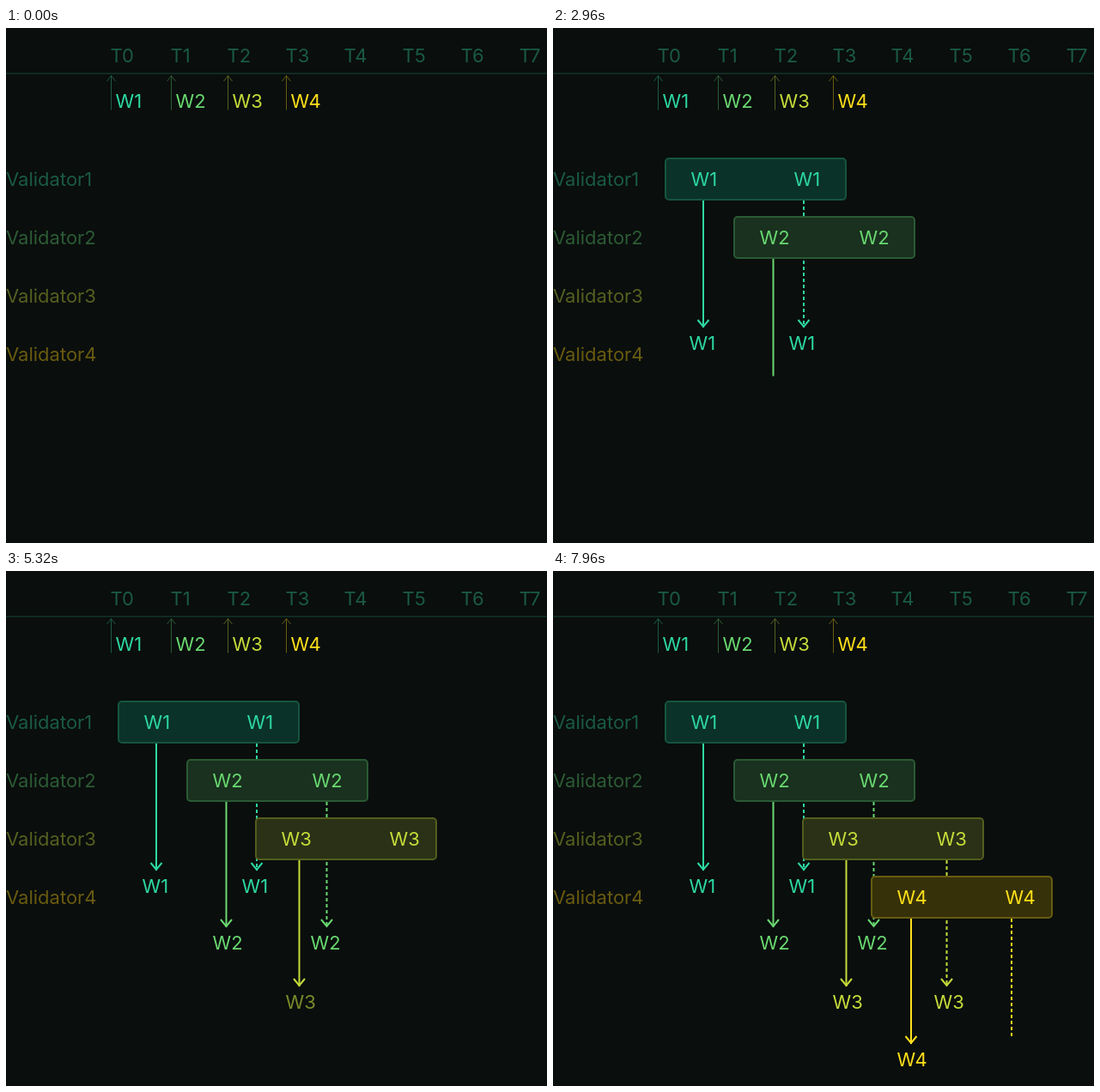
These frames come from a looping animation (630 by 600 pixels, 8000 ms). An HTML page:

```html
<!DOCTYPE html>
<html lang="en">
<head>
<meta charset="utf-8">
<title>Validator windows</title>
<style>
  html, body { margin: 0; width: 100%; height: 100%; overflow: hidden; background: #0a0e0d; }
  svg { display: block; width: 630px; height: 600px; }
  text { font: 22px Inter, "Liberation Sans", sans-serif; }
  path, line { fill: none; }
</style>
</head>
<body>
<svg id="stage" viewBox="0 0 630 600"></svg>
<script>
const LOOP = 8000, STEP = 2000;
const stage = document.getElementById('stage');

function add(parent, tag, attrs, text) {
  const el = document.createElementNS('http://www.w3.org/2000/svg', tag);
  for (const key in attrs) el.setAttribute(key, attrs[key]);
  if (text) el.textContent = text;
  parent.appendChild(el);
  return el;
}
const label = (parent, x, y, fill, text) => add(parent, 'text', { x: x - 0.4, y, fill }, text);

// solid and dashed: line x, label x, start y, tip y
const rows = [
  { color: '#2dd8a2', dim: '#1a5a45', fill: '#0b3228', edge: '#15543f', mark: 122, second: 281, base: 375,
    solid: [175, 159, 201, 349], dashed: [292, 275, 152, 349] },
  { color: '#69d870', dim: '#2c5b34', fill: '#19311e', edge: '#2a5a34', mark: 192, second: 357, base: 441,
    solid: [256.5, 241, 269, 415], dashed: [373.5, 355, 269, 415] },
  { color: '#c6dc3a', dim: '#565f1f', fill: '#2a3116', edge: '#545d1d', mark: 258, second: 447, base: 510,
    solid: [341.5, 326, 337, 484], dashed: [458.5, 444, 288, 484] },
  { color: '#ffe01a', dim: '#695b10', fill: '#363109', edge: '#675c10', mark: 326, second: 527, base: 577,
    solid: [417, 401, 405, 551], dashed: [534, 517, 356, 555] }
];

// timeline header
add(stage, 'line', { x1: 0, x2: 630, y1: 53, y2: 53, stroke: '#12352b', 'stroke-width': 1.5 });
[122, 192, 258, 326, 394, 462, 530, 598].forEach((x, i) => label(stage, x, 39.5, '#1a5a45', 'T' + i));

function addArrow([x, textX, top, tip], row, name, dash) {
  const pen = { stroke: row.color, 'stroke-width': 2 };
  return {
    top, tip,
    line: add(stage, 'line', { x1: x, x2: x, y1: top, y2: top, 'stroke-dasharray': dash, ...pen }),
    head: add(stage, 'path', { d: `M${x - 6.5} ${tip - 9}L${x} ${tip - 1}L${x + 6.5} ${tip - 9}`, ...pen }),
    text: label(stage, textX, row.base, row.color, name)
  };
}

rows.forEach((row, i) => {
  const name = 'W' + (i + 1), m = row.mark + 0.5, base = 183.5 + 68 * i, left = 131 + 80 * i;
  add(stage, 'path', { d: `M${m} 95.5V55.5M${m - 5} 62L${m} 55.5L${m + 5} 62`, stroke: row.dim });
  label(stage, row.mark + 6, 92.5, row.color, name);
  label(stage, 0.4, base, row.dim, 'Validator' + (i + 1));

  row.arrows = [addArrow(row.solid, row, name, 'none'), addArrow(row.dashed, row, name, '4 3')];

  row.box = add(stage, 'g', {});
  add(row.box, 'rect', { x: left, y: 152 + 68 * i, width: 210, height: 48, rx: 4,
    fill: row.fill, stroke: row.edge, 'stroke-width': 2 });
  label(row.box, left + 30, base, row.color, name);
  label(row.box, row.second, base, row.color, name);
});

const ramp = (t, start, length) => Math.min(1, Math.max(0, (t - start) / length));

function drawArrow(a, t) {
  const p = ramp(t, 0, 600);
  a.line.setAttribute('y2', a.top + (a.tip - a.top) * p);
  a.line.setAttribute('opacity', p > 0 ? 1 : 0);
  a.head.setAttribute('opacity', ramp(t, 600, 200));
  a.text.setAttribute('opacity', ramp(t, 800, 200));
}

function draw() {
  const now = performance.now() % LOOP;
  rows.forEach((row, i) => {
    const t = now - i * STEP, p = ramp(t, 0, 400);
    row.box.setAttribute('opacity', p);
    row.box.setAttribute('transform', `translate(0 ${-10 * (1 - p)})`);
    drawArrow(row.arrows[0], t - 400);
    drawArrow(row.arrows[1], t - 1400);
  });
  requestAnimationFrame(draw);
}
draw();
</script>
</body>
</html>
```
